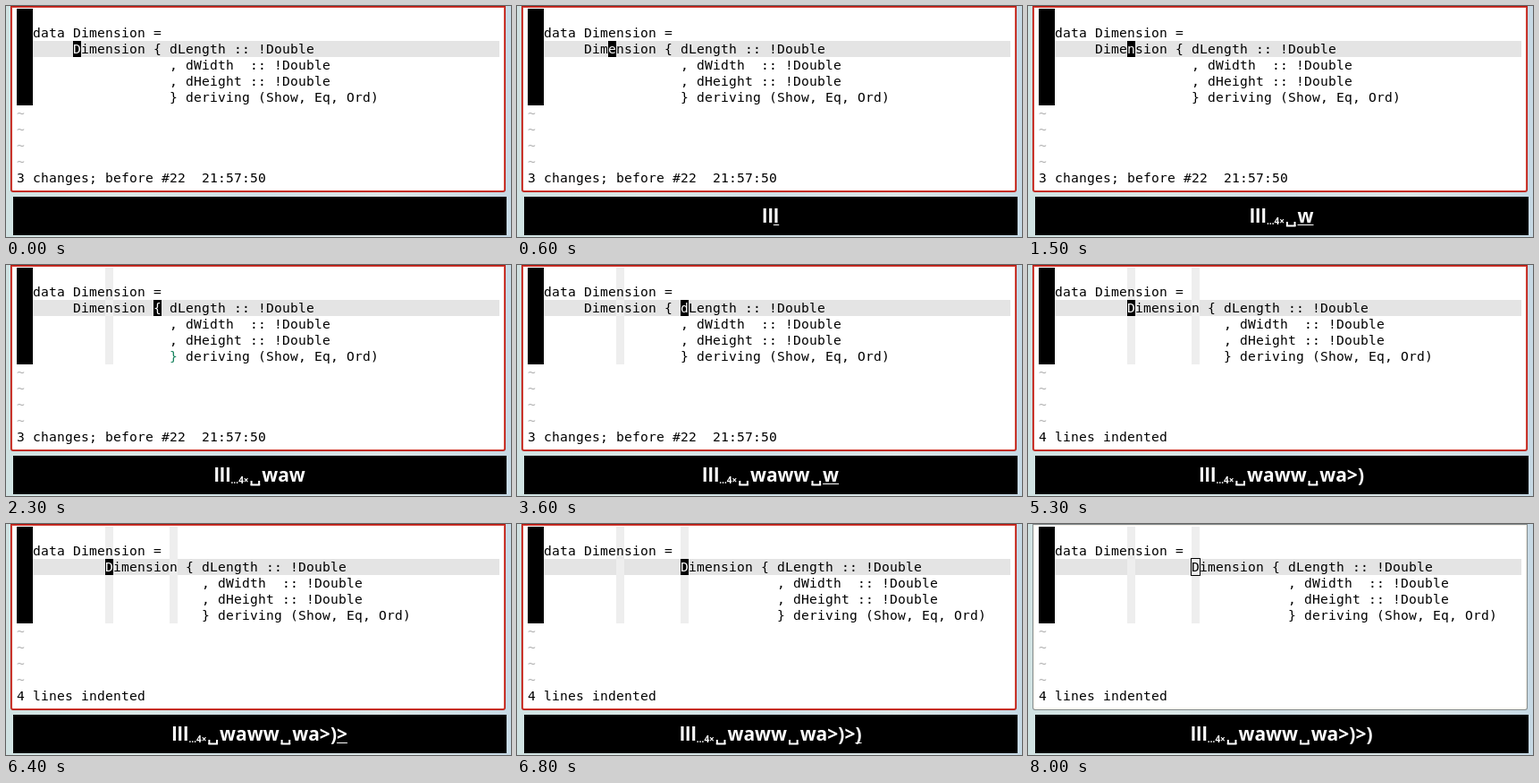
An HTML page with a canvas that plays this animation: 565x258 px, repeating every 8.2 s.

```html
<!DOCTYPE html>
<html lang="en">
<head>
<meta charset="utf-8">
<title>Editor indent demo</title>
<style>
  html, body { margin: 0; width: 100%; height: 100%; overflow: hidden; }
  canvas { display: block; width: 565px; height: 258px; }
</style>
</head>
<body>
<canvas id="stage" width="565" height="258"></canvas>
<script>
const ctx = document.getElementById("stage").getContext("2d", { alpha: false });
const LOOP = 8200, BLUR_AT = 8000, MARK_TIME = 200;
const CELL = 9, ROW = 18, LEFT = 12, TOP = 3, CURSOR_ROW = 2;
const MONO = '14.67px "DejaVu Sans Mono", monospace';
const KEY_FONT = 'bold 21px "Noto Sans", sans-serif';
const SUB_FONT = 'bold 10px "Noto Sans", sans-serif';
const KEY_CENTER = 283.6, SPACE_WIDTH = 14.6;

// "_" is the space bar; press times are in tenths of a second
const KEYS = "llll_waww_wa>)>)";
const PRESSES = [3, 5, 6, 8, 13, 15, 17, 21, 28, 32, 36, 38, 47, 51, 64, 67];

const CODE = [
  "     Dimension { dLength :: !Double",
  "                 , dWidth  :: !Double",
  "                 , dHeight :: !Double",
  "                 } deriving (Show, Eq, Ord)"
];

const colX = c => LEFT + c * CELL;
const rowY = r => TOP + r * ROW;

function rect(x, y, w, h, color) {
  ctx.fillStyle = color;
  ctx.fillRect(x, y, w, h);
}

function print(row, col, text, color = "#000") {
  ctx.font = MONO;
  ctx.fillStyle = color;
  [...text].forEach((ch, i) => {
    if (ch !== " ") ctx.fillText(ch, colX(col + i), rowY(row) + 14);
  });
}

// Replays the keys pressed so far; columns count from the start of the code.
function editorState(keys) {
  const state = { cursor: 5, guides: [], lines: CODE, status: "3 changes; before #22  21:57:50" };
  [...keys].forEach((key, i) => {
    const line = state.lines[0];
    if (key === "l") state.cursor++;
    if (key === "w" && keys[i - 1] !== "_") {
      state.cursor += line.slice(state.cursor).search(/\s\S/) + 1;
    }
    if (key === "a") state.guides.push(state.cursor);
    if (key === ")") {
      const start = line.search(/\S/);
      const stop = state.guides.find(g => g > start);
      state.lines = state.lines.map(s => " ".repeat(stop - start) + s);
      state.cursor = stop;
      state.status = "4 lines indented";
    }
  });
  return state;
}

function drawWallpaper() {
  const sky = ctx.createLinearGradient(0, 0, 565, 0);
  ["#d0e2e2", "#dbe7e5", "#cfdfe6", "#dde6e6", "#c6d9e5"]
    .forEach((color, i) => sky.addColorStop(i / 4, color));
  rect(0, 0, 565, 258, sky);
}

function drawWindow(focused) {
  const layers = focused
    ? ["#b81a12", "#d6483f", "#fbf3ee", "#fff"]
    : ["#858d8f", "#f6f1ea", "#fbf8f4", "#fff"];
  layers.forEach((color, i) => {
    ctx.beginPath();
    ctx.roundRect(5 + i, Math.min(i, 2), 554 - 2 * i, 208 - i - Math.min(i, 2), [0, 0, 3 - i, 3 - i]);
    ctx.fillStyle = color;
    ctx.fill();
  });
}

function drawEditor({ cursor, guides, lines, status }, focused) {
  rect(colX(2), rowY(CURSOR_ROW), 58 * CELL, ROW, "#e4e4e4");
  guides.forEach(g => rect(colX(2 + g), TOP, CELL, 6 * ROW, "#eee"));
  rect(LEFT, TOP, 2 * CELL, 6 * ROW, "#000");

  print(1, 2, "data Dimension =");
  lines.forEach((line, i) => print(CURSOR_ROW + i, 2, line));
  for (let r = 6; r < 10; r++) print(r, 0, "~", "#b2b2b2");
  print(10, 0, status);

  const under = lines[0][cursor];
  if (under === "{") {
    const col = 2 + lines[3].indexOf("}");
    rect(colX(col), rowY(5), CELL, ROW, "#fff");
    print(5, col, "}", "#16825d");
  }

  const x = colX(2 + cursor), y = rowY(CURSOR_ROW);
  if (focused) {
    rect(x, y, CELL, ROW, "#000");
    print(CURSOR_ROW, 2 + cursor, under, "#fff");
  } else {
    ctx.strokeStyle = "#000";
    ctx.lineWidth = 1;
    ctx.strokeRect(x - 0.5, y - 0.5, CELL + 1, ROW + 1);
  }
}

// Runs of more than three equal keys end in a small counter.
function keyGlyphs(keys) {
  const runs = keys.match(/(.)\1*/g) || [];
  return runs.flatMap(run => {
    const glyphs = [...run.slice(0, 3)].map(text => ({ text, font: KEY_FONT, base: 242 }));
    if (run.length > 3) glyphs.push({ text: `…${run.length}×`, font: SUB_FONT, base: 244 });
    return glyphs;
  });
}

function glyphWidth({ text, font }) {
  ctx.font = font;
  return text === "_" ? SPACE_WIDTH : ctx.measureText(text).width;
}

function drawSpaceMark(x) {
  const w = SPACE_WIDTH - 4;
  ctx.fillRect(x + 2, 241, 2, 5);
  ctx.fillRect(x + w, 241, 2, 5);
  ctx.fillRect(x + 2, 244.5, w, 2);
}

function drawKeys(keys, marked) {
  rect(8, 213, 552, 43, "#000");
  const glyphs = keyGlyphs(keys);
  const widths = glyphs.map(glyphWidth);
  let x = KEY_CENTER - widths.reduce((sum, w) => sum + w, 0) / 2;
  ctx.fillStyle = "#fff";
  glyphs.forEach((g, i) => {
    ctx.font = g.font;
    if (g.text === "_") drawSpaceMark(x);
    else ctx.fillText(g.text, x, g.base);
    if (marked && i === glyphs.length - 1) ctx.fillRect(x, g.base + 2, widths[i], 1);
    x += widths[i];
  });
}

function draw(t) {
  const pressed = PRESSES.filter(p => p * 100 <= t);
  const keys = KEYS.slice(0, pressed.length);
  const focused = t < BLUR_AT;
  drawWallpaper();
  drawWindow(focused);
  drawEditor(editorState(keys), focused);
  drawKeys(keys, t - pressed.at(-1) * 100 < MARK_TIME);
}

const start = performance.now();
function tick() {
  draw((performance.now() - start) % LOOP);
  requestAnimationFrame(tick);
}
tick();
</script>
</body>
</html>
```
